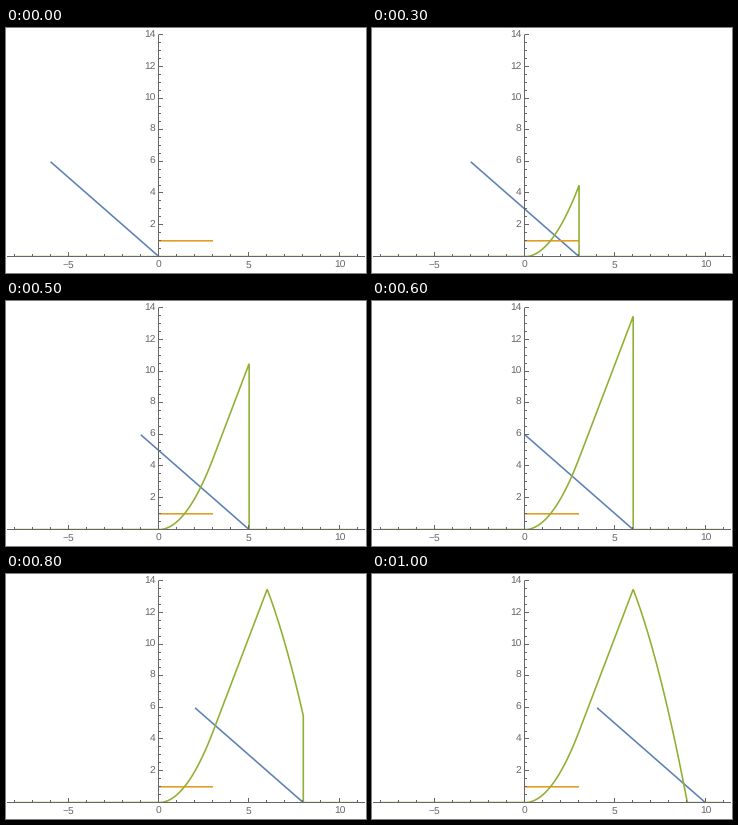
A matplotlib script for the animation above (1100 ms loop, 360 by 245 pixels).

```python
import numpy as np
import matplotlib.pyplot as plt
from matplotlib.animation import FuncAnimation

plt.rcParams["text.hinting"] = "none"

W, H, DPI = 360, 245, 100
PX = 72 / DPI  # points per pixel
X0, Y0, SX, SY = 152.9, 228.6, 18.05, 15.8
BLUE, ORANGE, GREEN, GRAY = "#5e81b5", "#e19c24", "#8fb032", "#666666"

fig = plt.figure(figsize=(W / DPI, H / DPI), dpi=DPI, facecolor="white")
ax = fig.add_axes([0, 0, 1, 1])
ax.set_xlim(0, W)
ax.set_ylim(H, 0)
ax.axis("off")


def px(x):
    return X0 + SX * np.asarray(x, float)


def py(y):
    return Y0 - SY * np.asarray(y, float)


def mid(v):
    """Pixel centre for a crisp hairline."""
    return np.floor(v - 0.4) + 0.5


def rule(xs, ys):
    ax.plot(xs, ys, color=GRAY, lw=PX, snap=False,
            solid_capstyle="butt", zorder=5)


def label(x, y, text, ha):
    ax.text(x, y, text, ha=ha, va="baseline", color=GRAY,
            family="Liberation Sans", size=10.3 * PX, zorder=6)


def curve(color):
    line, = ax.plot([], [], color=color, lw=1.6 * PX, snap=False,
                    solid_capstyle="butt", solid_joinstyle="miter")
    line.set_clip_path(plt.Rectangle((0, 0), W, 229, transform=ax.transData))
    return line


def draw_axes():
    base, left = mid(Y0), mid(X0)
    rule([1, 359], [base, base])
    rule([left, left], [7, 229])
    for x in range(-8, 12):
        major = x % 5 == 0
        c = mid(px(x))
        rule([c, c], [base, base - (4.5 if major else 2.5)])
        if major:
            label(c, 240, str(x).replace("-", "\u2212"), "center")
    for i in range(1, 29):
        major = i % 4 == 0
        c = mid(py(i / 2))
        rule([left, left + (4.5 if major else 2.5)], [c, c])
        if major:
            label(149.5, c + 2.5, str(i // 2), "right")


def overlap(t):
    """Convolution of a ramp on [0, 6] with a unit box on [0, 3]."""
    lo, hi = np.clip(t - 3, 0, 6), np.clip(t, 0, 6)
    return (hi**2 - lo**2) / 2


draw_axes()
ramp, box, area = curve(BLUE), curve(ORANGE), curve(GREEN)
box.set_data(px([0, 3]), py([1, 1]))


def update(t):
    ramp.set_data(px([t - 6, t]), py([6, 0]))
    s = np.linspace(0, t, 60 * t + 1)
    area.set_data(px(np.concatenate([[-8], s, [t, 11]])),
                  py(np.concatenate([[0], overlap(s), [0, 0]])))
    return ramp, area


anim = FuncAnimation(fig, update, frames=11, interval=100,
                     repeat=True, repeat_delay=0)
plt.show()
```
